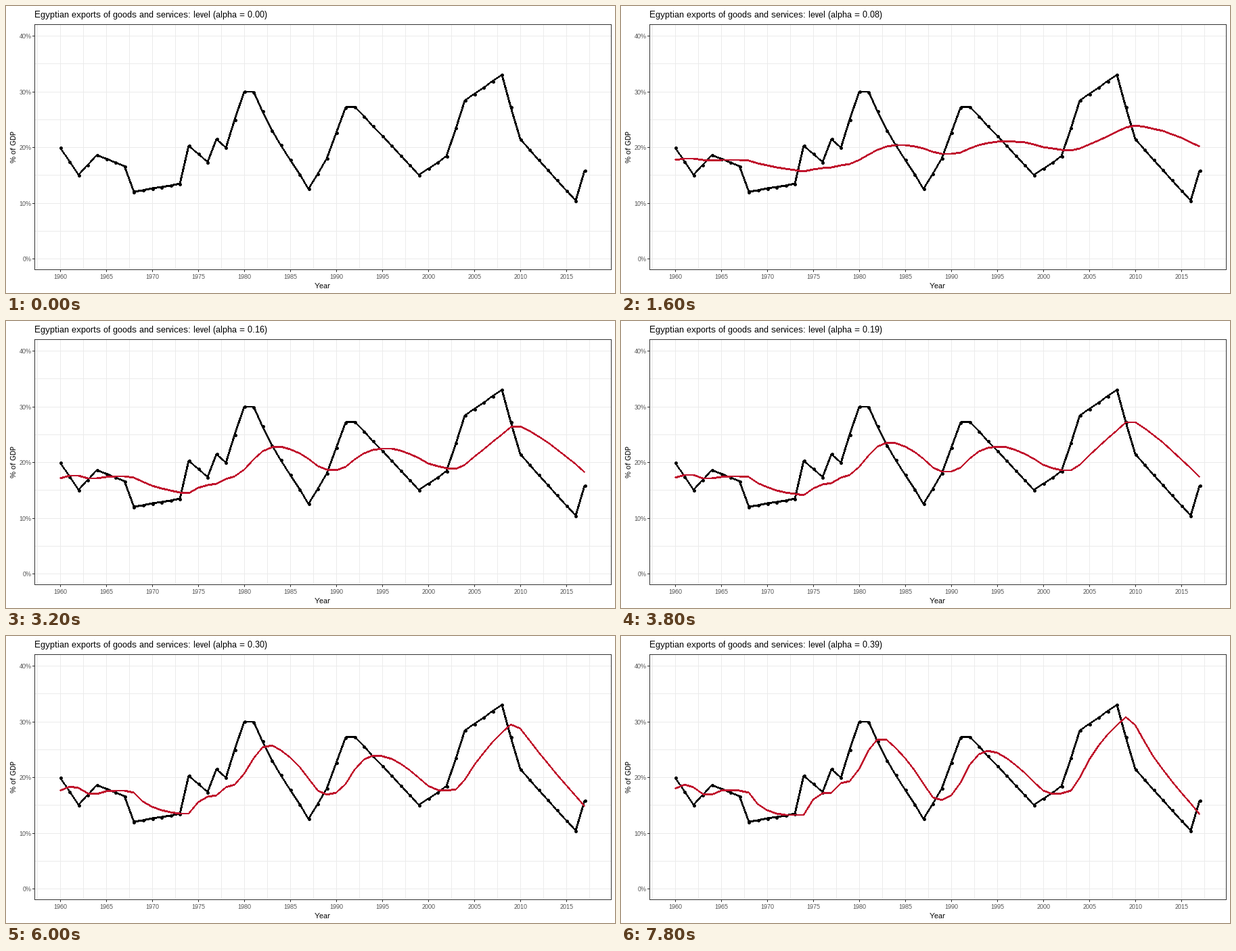
A matplotlib script that plays this animation: 900 by 425 pixels, repeating every 8 s.

```python
import numpy as np
import matplotlib.pyplot as plt
from matplotlib.animation import FuncAnimation
from matplotlib.collections import LineCollection
from matplotlib.patches import Rectangle

W, H, DPI = 900, 425, 100
PX = 72 / DPI  # points per pixel
FRAMES, STEP_MS = 40, 200
LEFT, RIGHT, TOP, BOTTOM = 42.5, 894.5, 27.5, 390.5
GRID, DARK, LABEL, RED = "#EBEBEB", "#333333", "#4D4D4D", "#C0132D"

# Turning points of the series: year and % of GDP
TURNS = [(1960, 19.9), (1962, 15), (1964, 18.6), (1967, 16.6), (1968, 12),
         (1973, 13.4), (1974, 20.3), (1976, 17.3), (1977, 21.5), (1978, 19.9),
         (1980.4, 32), (1983, 23), (1987, 12.5), (1989, 18), (1991.3, 28.5),
         (1999, 15), (2002, 18.4), (2004, 28.4), (2008, 33), (2010, 21.4),
         (2016, 10.4), (2017, 15.8)]
years = np.arange(1960, 2018)
exports = np.interp(years, *zip(*TURNS))

plt.rcParams.update({"font.family": "Liberation Sans",
                     "text.hinting": "native", "text.hinting_factor": 1})
fig = plt.figure(figsize=(W / DPI, H / DPI), dpi=DPI, facecolor="white")
ax = fig.add_axes([0, 0, 1, 1])
ax.set_xlim(0, W)
ax.set_ylim(H, 0)
ax.axis("off")


def to_x(year):
    return 80.5 + 13.6 * (year - 1960)


def to_y(percent):
    return 374.5 - 8.25 * percent


def pixel(v):
    return np.floor(v) + 0.5


def rule(x0, y0, x1, y1, color):
    ax.plot([x0, x1], [y0, y1], color=color, lw=PX, antialiased=False,
            snap=False, solid_capstyle="butt", zorder=1)


def label(x, y, text, size, color="black", **kw):
    return ax.text(x, y, text, fontsize=size * PX, color=color,
                   va="baseline", **kw)


def segments(values):
    pts = np.floor(np.column_stack([to_x(years), to_y(values)]))
    return np.stack([pts[:-1], pts[1:]], axis=1)


def widths(segs):
    # Two pixels when flat or steep, one near the diagonal
    dx, dy = (segs[:, 1] - segs[:, 0]).T
    return (2 - np.sin(2 * np.arctan2(dy, dx)) ** 2) * PX


def stroke(values, color, z):
    segs = segments(values)
    lines = LineCollection(segs, colors=color, linewidths=widths(segs),
                           antialiaseds=False, snap=False, zorder=z)
    ax.add_collection(lines, autolim=False)
    return lines


def smooth(alpha):
    """One-step fits of simple smoothing with the least-squares start level."""
    base = np.zeros(len(exports))
    for t in range(1, len(exports)):
        base[t] = alpha * exports[t - 1] + (1 - alpha) * base[t - 1]
    weight = (1 - alpha) ** np.arange(len(exports))
    start = weight @ (exports - base) / (weight @ weight)
    return base + weight * start


def title_text(alpha):
    return f"Egyptian exports of goods and services: level (alpha = {alpha:.2f})"


for year in np.arange(1957.5, 2018, 2.5):
    x = pixel(to_x(year))
    rule(x, TOP, x, BOTTOM, GRID)
for percent in range(0, 41, 5):
    y = pixel(to_y(percent))
    rule(LEFT, y, RIGHT, y, GRID)

for year in range(1960, 2016, 5):
    x = pixel(to_x(year))
    rule(x, BOTTOM, x, BOTTOM + 3, DARK)
    label(x, 404, str(year), 9, LABEL, ha="center")
for percent in range(0, 41, 10):
    y = pixel(to_y(percent))
    rule(LEFT - 3, y, LEFT, y, DARK)
    label(37.5, y + 3.5, f"{percent}%", 9, LABEL, ha="right")

ax.add_patch(Rectangle((LEFT, TOP), RIGHT - LEFT, BOTTOM - TOP, fill=False,
                       ec=DARK, lw=PX, antialiased=False, snap=False,
                       zorder=6))
label(468, 418, "Year", 11, ha="center")
label(15, 208.5, "% of GDP", 11, ha="center", rotation=90,
      rotation_mode="anchor")
title = label(42, 17, title_text(0), 13)

stroke(exports, "black", 3)
ax.plot(to_x(years), to_y(exports), "o", color="black", ms=5 * PX, mew=0,
        antialiased=False, zorder=4)
fit = stroke(smooth(0), RED, 5)


def update(i):
    alpha = i / 100
    title.set_text(title_text(alpha))
    segs = segments(smooth(alpha))
    fit.set_segments(segs)
    fit.set_linewidths(widths(segs))
    fit.set_visible(i > 0)
    return title, fit


def reset():
    return update(0)


anim = FuncAnimation(fig, update, frames=FRAMES, init_func=reset,
                     interval=STEP_MS, repeat=True, repeat_delay=0)
plt.show()
```
